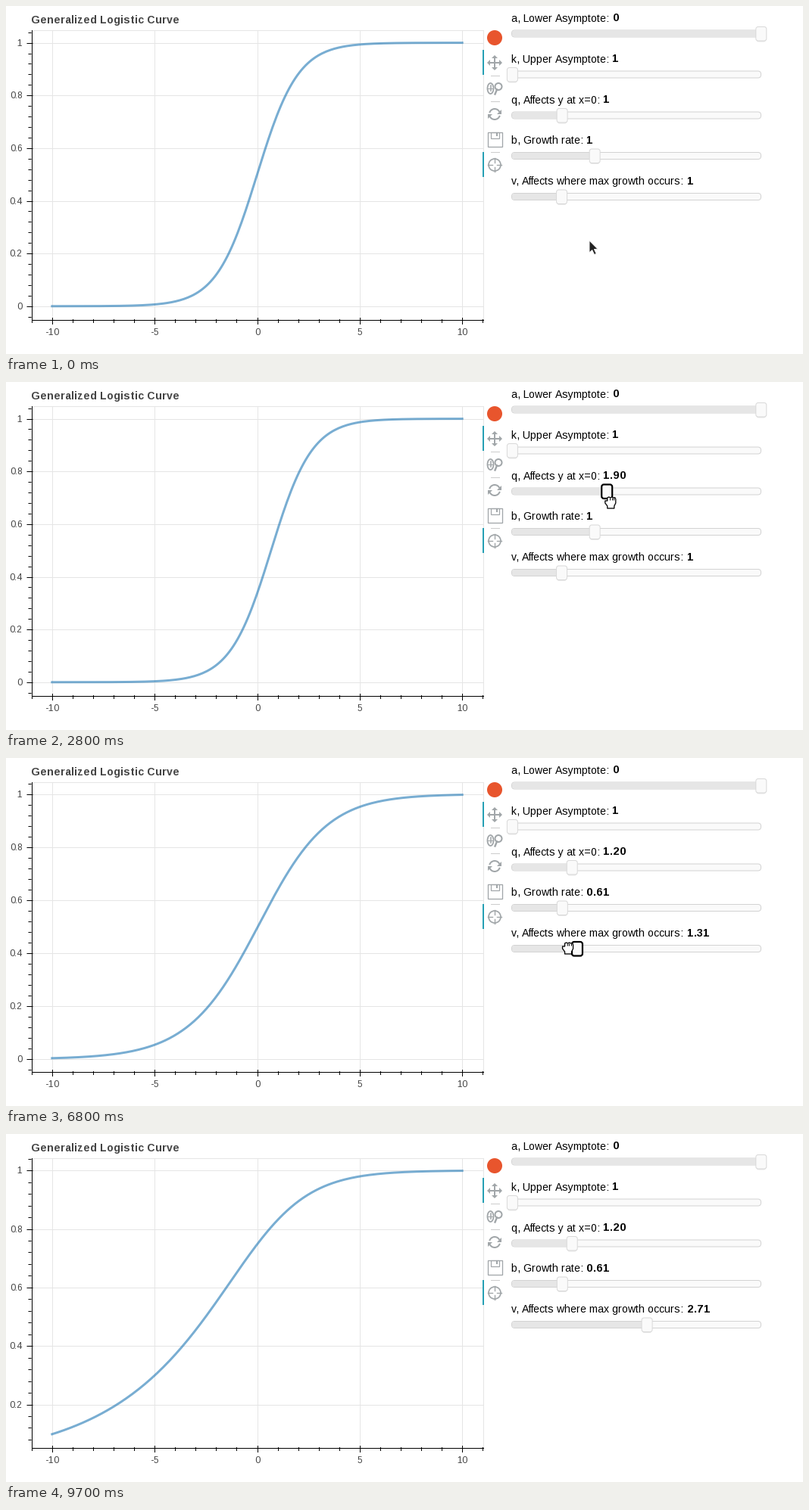
A matplotlib script for the animation above (9.8 s loop, 1052 by 460 pixels).

```python
import numpy as np
import matplotlib.pyplot as plt
from matplotlib.animation import FuncAnimation
from matplotlib.collections import LineCollection
from matplotlib.patches import Arc, Circle, Ellipse, FancyBboxPatch, Polygon, Rectangle

W, H, DPI = 1052, 460, 64
FRAMES, STEP_MS = 98, 100
PX = 72 / DPI
LAG = 0.6

plt.rcParams.update({
    "toolbar": "None",
    "font.family": "Liberation Sans",
    "text.hinting_factor": 1,
})

fig = plt.figure(figsize=(W / DPI, H / DPI), dpi=DPI, facecolor="white")
ax = fig.add_axes([0, 0, 1, 1])
ax.set_xlim(0, W)
ax.set_ylim(H, 0)
ax.axis("off")

LEFT, RIGHT, TOP, BOTTOM = 33.5, 629.5, 31.5, 414.5
GRID, ICON, TEAL = "#e5e5e5", "#a1a6a9", "#26a0b5"


# ---------- drawing helpers ----------
def line(xs, ys, color="black", width=1, z=2, **kw):
    return ax.plot(xs, ys, color=color, lw=width * PX, zorder=z, **kw)[0]


def segments(color, width=1, z=2, segs=()):
    lines = LineCollection(segs, colors=color, linewidths=width * PX, zorder=z)
    ax.add_collection(lines)
    return lines


def text(x, y, s, size=14, color="black", **kw):
    return ax.text(x, y, s, fontsize=size * PX, color=color, va="baseline", zorder=5, **kw)


def shape(patch):
    ax.add_patch(patch)
    return patch


def box(x, y, w, h, radius, fill, edge, z, width=1):
    style = f"round,pad=0,rounding_size={radius}"
    return shape(FancyBboxPatch((x, y), w, h, boxstyle=style, fc=fill, ec=edge,
                                lw=width * PX, zorder=z))


# ---------- plot ----------
def px_x(x):
    return 60.8 + (x + 10) * 27.07


def logistic(x, q, b, v):
    return (1 + q * np.exp(-b * x)) ** (-1 / v)


text(33, 23, "Generalized Logistic Curve", color="#444444", weight="bold")
segments(GRID, z=1, segs=[[(px_x(x), TOP), (px_x(x), BOTTOM)] for x in range(-10, 11, 5)])
line([LEFT, RIGHT, RIGHT], [TOP, TOP, BOTTOM], GRID, z=1)
line([LEFT, LEFT], [TOP, BOTTOM])
line([LEFT, RIGHT], [BOTTOM, BOTTOM])
for x in range(-11, 12):
    major = x % 5 == 0
    px = min(max(px_x(x), LEFT), RIGHT)
    line([px, px], [412, 420] if major else [414, 418])
    if major:
        text(px, 435, str(x), 12, "#444444", ha="center")

y_grid = segments(GRID, z=1)
y_major, y_minor = segments("black"), segments("black")
y_labels = [text(21, 0, f"{k / 5:g}", 12, "#444444", ha="right") for k in range(6)]
curve = line([], [], "#1f77b4", 3, z=3, alpha=0.6)
XS = np.linspace(-10, 10, 200)


def draw_plot(q, b, v):
    ys = logistic(XS, q, b, v)
    lo, hi = ys[0], ys[-1]
    span = hi - lo

    def px_y(y):
        return 396.8 - (y - lo) / span * 348.2

    def visible(y):
        return lo - 0.05 * span <= y <= hi + 0.05 * span

    curve.set_data(px_x(XS), px_y(ys))
    majors = [px_y(k / 5) for k in range(6) if visible(k / 5)]
    minors = [px_y(k / 25) for k in range(-2, 28) if visible(k / 25)]
    y_grid.set_segments([[(LEFT, y), (RIGHT, y)] for y in majors])
    y_major.set_segments([[(27, y), (35, y)] for y in majors])
    y_minor.set_segments([[(29, y), (33, y)] for y in minors])
    for k, label in enumerate(y_labels):
        label.set_visible(visible(k / 5))
        label.set_y(round(px_y(k / 5)) + 4)


# ---------- toolbar ----------
def draw_toolbar():
    cx = 645
    shape(Circle((cx, 42), 10, fc="#e8552d", lw=0))
    for y in (58, 193):
        shape(Rectangle((629, y), 2, 33, fc=TEAL, lw=0, zorder=3))
    for y in (91.5, 125.5, 192.5):
        line([640, 651], [y, y], "#cccccc")

    # pan
    line([cx, cx], [67, 83], ICON, 2)
    line([cx - 8, cx + 8], [75, 75], ICON, 2)
    for dx, dy in ((0, 1), (0, -1), (1, 0), (-1, 0)):
        tip = np.array([cx + 10 * dx, 75 + 10 * dy])
        back = tip - 4 * np.array([dx, dy])
        side = 4 * np.array([dy, dx])
        shape(Polygon([tip, back + side, back - side], fc=ICON, lw=0))

    # wheel zoom
    shape(Ellipse((639.5, 109), 8, 14, fc="none", ec=ICON, lw=1.8 * PX))
    line([639.5, 639.5], [105, 112], ICON, 1.6)
    line([636, 643], [109, 109], ICON, 1)
    shape(Circle((650, 106.5), 4.5, fc="none", ec=ICON, lw=2 * PX))
    line([648, 645.5], [110.5, 116.5], ICON, 2.4)

    # reset
    for start in (195, 15):
        shape(Arc((cx, 143), 14, 14, theta1=start, theta2=start + 140, ec=ICON, lw=2 * PX))
    for s in (1, -1):
        tri = [(9, -6), (9, 0), (3, 0)]
        shape(Polygon([(cx + s * x, 143 + s * y) for x, y in tri], fc=ICON, lw=0))

    # save
    shape(Rectangle((635.5, 166.5), 19, 19, fc="none", ec=ICON, lw=1.3 * PX))
    shape(Rectangle((639.5, 166.5), 11, 8, fc="none", ec=ICON, lw=1.2 * PX))
    shape(Rectangle((646.5, 168), 2.5, 4, fc=ICON, lw=0))

    # crosshair
    shape(Circle((cx, 210), 8, fc="none", ec=ICON, lw=1.7 * PX))
    for s in (1, -1):
        line([cx, cx], [210 + 3 * s, 210 + 9 * s], ICON, 1.4)
        line([cx + 3 * s, cx + 9 * s], [210, 210], ICON, 1.4)


# ---------- sliders ----------
class Slider:
    def __init__(self, y, label, value_x, lo, hi, keys=((0, 1),), focus=(0, 0)):
        self.lo, self.hi, self.focus = lo, hi, focus
        self.times, self.values = zip(*keys)
        box(667.5, y - 4.5, 329, 9, 4, "#fafafa", "#d3d3d3", 2)
        self.fill = box(668, y - 4, 10, 8, 3, "#e6e6e6", "none", 3, 0)
        self.shadow = box(0, y - 8, 13, 19, 3, "#000000", "none", 4, 0)
        self.shadow.set_alpha(0.09)
        self.knob = box(0, y - 9, 14, 18.5, 3, "#fafafa", "#d9d9d9", 5)
        text(667, y - 16, label)
        self.number = text(value_x, y - 16, "", weight="bold")

    def raw(self, t):
        return float(np.interp(t, self.times, self.values))

    def snapped(self, t):
        value = self.raw(t)
        if value in (0, 1):
            return value
        return round(self.lo + 0.1 * round((value - self.lo) / 0.1), 2)

    def px(self, value):
        return 668.4 + 328.4 * (value - self.lo) / (self.hi - self.lo)

    def draw(self, t):
        value = self.snapped(t)
        x = self.px(value)
        on = self.focus[0] <= t < self.focus[1]
        self.fill.set_width(max(x - 668, 6))
        self.shadow.set_x(x - 6.5)
        self.knob.set_x(x - 7)
        self.knob.set_edgecolor("black" if on else "#d9d9d9")
        self.knob.set_linewidth((2.2 if on else 1) * PX)
        self.number.set_text(f"{value:.0f}" if value == int(value) else f"{value:.2f}")


Q_KEYS = ((15, 1), (17, 1.5), (19, 2.38), (20, 2.4), (22, 3), (23, 2.95), (25, 2.3), (33, 1.2))
B_KEYS = ((38, 1), (39, 1.2), (40, 1.21), (44, 2), (46, 2.11), (48, 2.11), (54, 0.71), (56, 0.61))
V_KEYS = ((67, 1), (72, 2.52), (73, 2.68), (76, 3.21), (77, 3.21), (80, 2.81), (83, 2.81), (84, 2.71))

draw_toolbar()
low = Slider(36.5, "a, Lower Asymptote: ", 801, -1, 0, ((0, 0),))
top = Slider(90.5, "k, Upper Asymptote: ", 800, 1, 10)
q = Slider(144.5, "q, Affects y at x=0: ", 788, 0, 5, Q_KEYS, (16, 37))
b = Slider(198, "b, Growth rate: ", 766, 0.01, 3, B_KEYS, (38, 68))
v = Slider(252, "v, Affects where max growth occurs: ", 899, 0.01, 5, V_KEYS, (68, 97))
sliders = (low, top, q, b, v)


# ---------- mouse ----------
ARROW = np.array([(0, 0), (0, 16), (3.7, 12.6), (6.6, 18.6), (9.2, 17.4), (6.4, 11.6), (11, 11.2)])
FIST = np.array([(-4, 8), (-4, 5), (-7, 1), (-7, -2), (-4, -2), (-4, -6), (-2, -7), (0, -6),
                 (2, -7), (4, -6), (6, -6.3), (7, -4), (7, 1), (5, 5), (5, 8)])
HAND = FIST - [[0, 2.2 if y < -3 else 0] for _, y in FIST]

PATH = np.array([(2, 770, 310), (4, 748, 231), (10, 734, 156), (34, 747, 159), (38, 785, 204),
                 (56, 747, 199), (62, 746, 250), (66, 734, 261), (85, 846, 251), (89, 828, 255),
                 (91, 700, 215), (92, 560, 150), (94, 500, 11)])
DRAGS = ((16, 34, q, 0, 159), (40, 56, b, 1.5, 199), (68, 85, v, 0, 251))

pointer = shape(Polygon(ARROW, closed=True, joinstyle="round", zorder=9))
knuckles = segments("black", 1, z=10)
cross = segments("black", 1, z=9)
spans = segments("black", 1, z=4)


def mouse(t):
    for first, last, slider, dx, y in DRAGS:
        if first <= t <= last:
            return "fist", slider.px(slider.raw(t - LAG)) + dx, y
    x, y = (np.interp(t, PATH[:, 0], PATH[:, k]) for k in (1, 2))
    if t >= 95:
        kind = "none"
    elif t >= 92:
        kind = "cross"
    elif t in (9, 10, 38, 65, 66):
        kind = "hand"
    else:
        kind = "arrow"
    return kind, x, y


def draw_mouse(t):
    kind, x, y = mouse(t)
    grip = kind in ("fist", "hand")
    pointer.set_visible(grip or kind == "arrow")
    outline = {"fist": FIST, "hand": HAND}.get(kind, ARROW)
    pointer.set_xy(outline + [x, y])
    pointer.set_facecolor("white" if grip else "#222222")
    pointer.set_edgecolor("black" if grip else "#f4f4f4")
    pointer.set_linewidth((1.3 if grip else 0.9) * PX)
    knuckles.set_segments([[(x + d, y - 6), (x + d, y - 3)] for d in (-1, 1.8, 4.5)] if grip else [])
    plus = [[(x - 8, y), (x + 8, y)], [(x, y - 8), (x, y + 8)]]
    cross.set_segments(plus if kind == "cross" else [])
    inside = kind == "cross" and TOP < y < BOTTOM
    spans.set_segments([[(LEFT, y), (RIGHT, y)], [(x, TOP), (x, BOTTOM)]] if inside else [])


# ---------- timeline ----------
# The picture moves only inside these spans and holds still between them.
LIVE = ((0, 0), (3, 4), (6, 10), (16, 34), (37, 38), (40, 44), (46, 46), (48, 54),
        (56, 62), (64, 66), (68, 76), (78, 85), (89, 92), (94, 95), (97, 97))


def update(i):
    t = max(min(i, last) for first, last in LIVE if first <= i)
    for slider in sliders:
        slider.draw(t)
    draw_plot(*(s.raw(t - LAG) for s in (q, b, v)))
    draw_mouse(t)
    return []


anim = FuncAnimation(fig, update, frames=FRAMES, interval=STEP_MS, repeat=True,
                     repeat_delay=0, blit=False)
plt.show()
```
